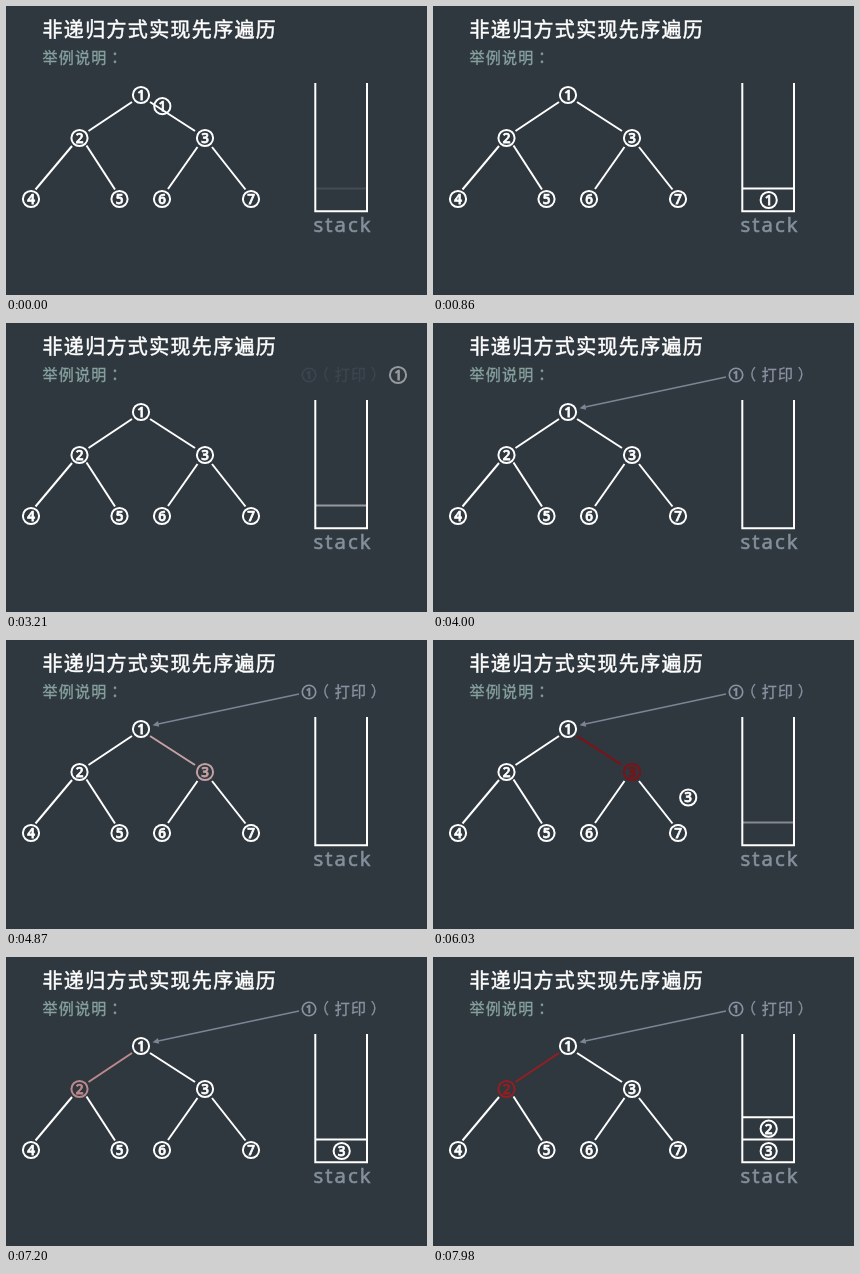
Recreate the animation shown at these times as an HTML page. Size 421 by 289 pixels, loop 8 s.

```html
<!DOCTYPE html>
<html lang="zh">
<head>
<meta charset="utf-8">
<style>
  html, body { margin: 0; width: 100%; height: 100%; overflow: hidden; background: #2f373f; }
  svg { display: block; width: 421px; height: 289px; }
  text { font-family: "Noto Sans CJK SC", "Noto Sans CJK", sans-serif; fill: currentColor; stroke: currentColor; stroke-width: .35; }
  .title { font-size: 20px; font-weight: 500; letter-spacing: 1.33px; stroke-width: .5; }
  .note { font-size: 15px; letter-spacing: 1.25px; }
  .colon { font-family: "Noto Sans CJK TC", "Noto Sans CJK", sans-serif; }
  .stack { font: 20.5px "Open Sans", "Noto Sans", sans-serif; letter-spacing: 2px; stroke-width: .6; }
  .digit { font: 600 13.5px "Open Sans", "Noto Sans", sans-serif; text-anchor: middle; stroke-width: .75; }
  .line { fill: none; stroke: currentColor; stroke-width: 2; }
</style>
</head>
<body>
<svg viewBox="0 0 421 289" color="#fff">
  <text class="title" x="36.5" y="31">非递归方式实现先序遍历</text>
  <text class="note" x="36.5" y="57" color="#86a19d">举例说明<tspan class="colon" lang="zh-TW">：</tspan></text>
  <path class="line" d="M309.3 77V205.3H361V77"/>
  <text class="stack" x="307.5" y="225.5" color="#84909b">stack</text>
  <g id="tree"></g>
  <path class="line" id="low" d="M309 182.5H361"/>
  <path class="line" id="high" d="M309 160.3H361"/>
  <g id="print" color="#8b91a0">
    <text class="note" x="308" y="57">（<tspan dx="4.5">打印</tspan><tspan dx="3.5">）</tspan></text>
  </g>
  <g id="arrow" color="#7d8494">
    <path class="line" style="stroke-width:1.4" d="M293 54L151 84.2"/>
    <path d="M146.5 85.2L152 81L153.2 86.8Z" fill="currentColor"/>
  </g>
  <g id="moving"></g>
</svg>
<script>
const LOOP = 8000;
const $ = id => document.getElementById(id);
const nodes = [[135, 89], [73.5, 132], [199, 132], [25, 193], [113.5, 193], [156, 193], [245, 193]];
const edges = [
  [2, 126, 96, 82.5, 125], [3, 144, 96, 189, 125], [4, 66, 140, 29.5, 183.5],
  [5, 80.5, 139.5, 109, 183.5], [6, 191.5, 141, 162, 183], [7, 206, 141, 239.5, 183.5]
];
const bottom = [335.7, 194], second = [335.7, 171.7], output = [392, 52];

function add(parent, tag, attrs) {
  const el = document.createElementNS("http://www.w3.org/2000/svg", tag);
  for (const key in attrs) el.setAttribute(key, attrs[key]);
  return parent.appendChild(el);
}

function badge(parent, n, [x, y], scale = 1) {
  const g = add(parent, "g", { transform: `translate(${x} ${y}) scale(${scale})` });
  add(g, "circle", { r: 8.1, class: "line" });
  add(g, "text", { class: "digit", y: 4.8 }).textContent = n;
  return g;
}

// Each branch is a node with the edge leading to it, so both share a colour.
const branch = {};
nodes.forEach((pos, i) => {
  const g = branch[i + 1] = add($("tree"), "g", {});
  badge(g, i + 1, pos);
});
for (const [n, x1, y1, x2, y2] of edges) add(branch[n], "line", { class: "line", x1, y1, x2, y2 });

badge($("print"), 1, [303, 52], .83);
const discs = [1, 2, 3].map(n => badge($("moving"), n, nodes[n - 1]));

const ramp = (t, from, to) => Math.min(1, Math.max(0, (t - from) / (to - from)));
const fade = (el, v) => el.setAttribute("opacity", v);

function place(el, a, b, p) {
  const [x, y] = a.map((v, i) => v + (b[i] - v) * p);
  el.setAttribute("transform", `translate(${x} ${y})`);
}

// The cross-fade from white to red dims slightly halfway.
function tint(el, red, k) {
  el.setAttribute("color", `rgb(${red.map(v => 255 + (v - 255) * k)})`);
  fade(el, 1 - .4 * k * (1 - k));
}

function draw(t) {
  const push1 = ramp(t, -84, 716), pop1 = ramp(t, 2330, 3130), gone1 = ramp(t, 3130, 3290);
  const push3 = ramp(t, 5702, 6502), push2 = ramp(t, 7400, 7970);

  if (pop1) place(discs[0], bottom, output, pop1);
  else place(discs[0], nodes[0], bottom, push1);
  place(discs[1], nodes[1], second, push2);
  place(discs[2], nodes[2], bottom, push3);
  fade(discs[0], 1 - gone1);
  fade(discs[1], push2 > 0 ? 1 : 0);
  fade(discs[2], push3 > 0 ? 1 : 0);

  fade($("low"), Math.max(push1 * (1 - gone1), push3));
  fade($("high"), push2);
  fade($("print"), ramp(t, 3130, 3680));
  fade($("arrow"), ramp(t, 3680, 4000));

  tint(branch[3], [130, 16, 20], ramp(t, 4590, 5400) - ramp(t, 6500, 6980));
  tint(branch[2], [150, 30, 33], ramp(t, 7000, 7420));
}

function frame() {
  draw(performance.now() % LOOP);
  requestAnimationFrame(frame);
}
frame();
</script>
</body>
</html>
```
